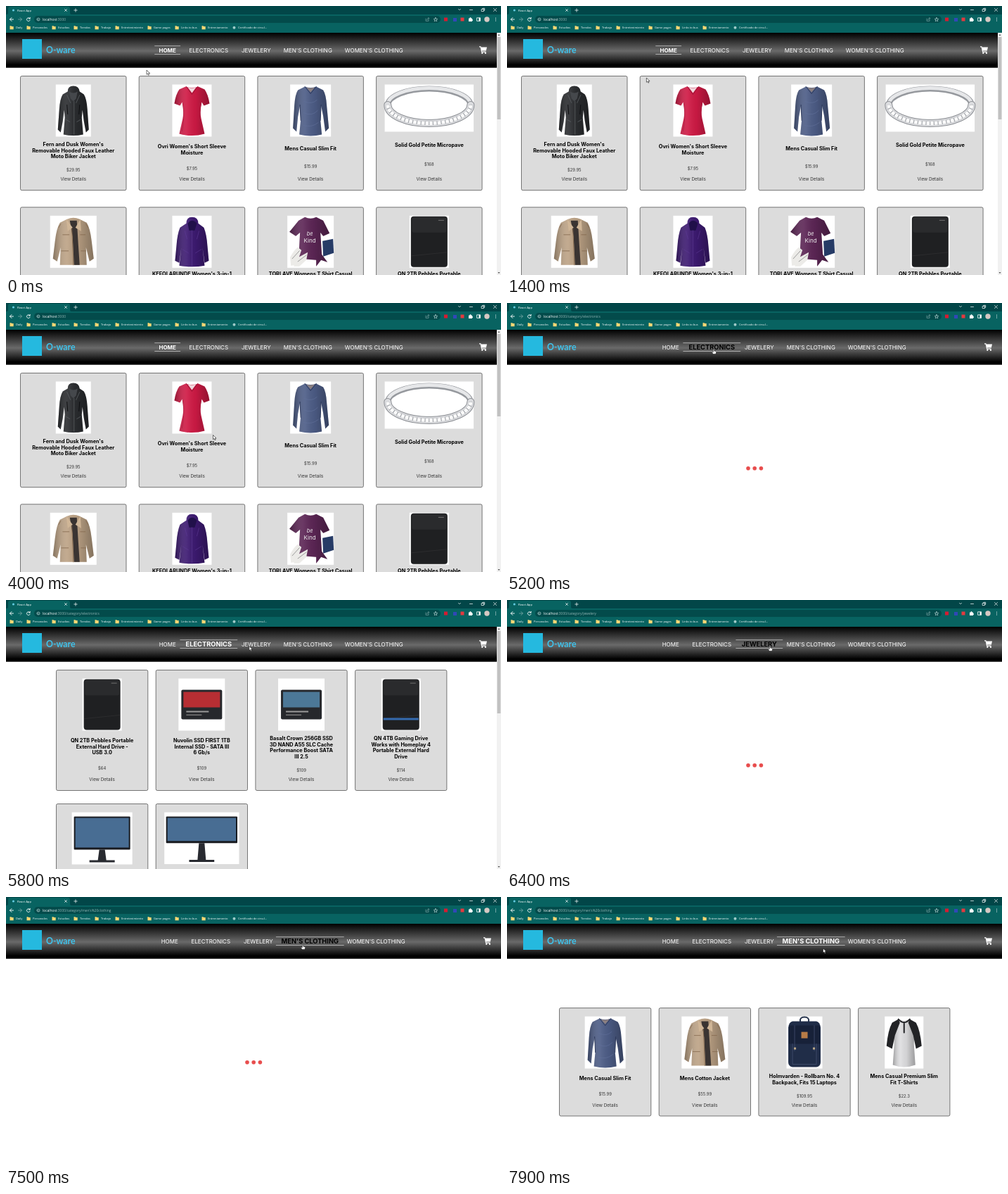
These frames come from a looping animation (704x382 px, 8 s). An HTML page:

```html
<!DOCTYPE html>
<html lang="en">
<head>
<meta charset="utf-8">
<title>Shop</title>
<style>
html, body { margin: 0; width: 100%; height: 100%; overflow: hidden; background: #fff; }
svg { display: block; width: 100vw; height: 100vh; }
text { font-family: Inter, "Open Sans", sans-serif; }
.ui { font-family: "Open Sans", "Noto Sans", sans-serif; font-weight: 500; }
.logo { font-family: Lato, sans-serif; font-weight: 700; }
</style>
</head>
<body>
<svg id="stage" viewBox="0 0 704 382"></svg>
<script>
const LOOP = 8000, STEP = 100;

const rect = (x, y, w, h, fill, more = '') =>
  `<rect x="${x}" y="${y}" width="${w}" height="${h}" fill="${fill}" ${more}/>`;
const circle = (x, y, r, fill) => `<circle cx="${x}" cy="${y}" r="${r}" fill="${fill}"/>`;
const shape = (fill, d) => `<path fill="${fill}" d="${d}"/>`;
const cloth = (fill, d) => shape(fill, d) + shape('url(#folds)', d);
const line = (stroke, d, width = 0.8) =>
  `<path fill="none" stroke="${stroke}" stroke-width="${width}" stroke-linecap="round" stroke-linejoin="round" d="${d}"/>`;
const group = (x, y, body, scale = 1) => `<g transform="translate(${x} ${y}) scale(${scale})">${body}</g>`;
// y is the vertical centre of the line
const text = (x, y, size, body, more = '') =>
  `<text x="${x}" y="${y + size * 0.36}" font-size="${size}" ${more}>${body}</text>`;
const MID = 'text-anchor="middle" ';

// Product pictures: [width, height, markup], centred on x = 0
const drive = rect(-26, 1, 52, 72, '#1f2022', 'rx="4"') + rect(-24.5, 2, 49, 22, '#2a2b2d', 'rx="3"') +
  rect(13, 6, 8, 1.2, '#666') + line('#343537', 'M-25 57L25 52', 0.6);
const ssd = color => rect(-29, 16, 58, 42, '#26282c', 'rx="2"') + rect(-26, 19, 52, 22, color) +
  rect(-22, 46, 32, 2, '#999') + rect(-22, 51, 22, 1.5, '#777');
const screen = (w, h) => rect(-w / 2, 6, w, h, '#191b20', 'rx="1"') + rect(-w / 2 + 2, 8, w - 4, h - 5, '#486d93') +
  shape('#282a30', `M-4 ${h + 6}H4L6 68H18V71H-18V68H-6Z`);
const oval = (rx, ry, cy, w, color = '#999ca1') =>
  `<ellipse cx="0" cy="${cy}" rx="${rx}" ry="${ry}" fill="none" stroke="${color}" stroke-width="${w}"/>`;
const front = 'M-59 29A59 26 0 0 0 59 29';

const ART = {
  leather: [50, 74, cloth('#2a2c2f', 'M-8 10Q-8 2 0 2Q8 2 9 10L15 14Q19 20 20 36L22 64L18 68L15 52L13 36L12 47L14 71Q0 74-14 71L-12 47L-13 36L-15 52L-18 68L-22 64L-20 36Q-19 20-15 14Z') +
    shape('#45484c', 'M-6 10Q0 14 6 10L4 20L0 24L-4 20Z') +
    line('#5b5f63', 'M1 24V71M-9 15L-4 26M9 15L4 26M-10 50L-5 53M10 50L5 53') +
    line('#0d0e10', 'M-9 29L-8 42M9 29L8 42', 1)],
  tee: [56, 74, cloth('#d01a45', 'M-9 3Q0 6 9 3L18 7Q23 14 25 27L17 30L14 25Q11 38 13 48L18 70Q0 75-18 70L-13 48Q-11 38-14 25L-17 30L-25 27Q-23 14-18 7Z') +
    shape('#f0d9de', 'M-6 4Q0 6 6 4L0 12Z') + line('#9b1233', 'M-8 3L0 14L8 3', 1) +
    line('#a9143a', 'M-13 27Q-10 44-14 66M13 27Q9 42 13 66', 0.6)],
  slim: [58, 74, cloth('#4d5d87', 'M-8 3Q0 6 8 3L18 8Q22 14 23 30L26 62L21 67L18 45L15 30L14 50L16 71Q0 75-16 71L-14 50L-15 30L-18 46L-20 67L-25 62L-23 30Q-22 14-18 8Z') +
    shape('#8b7f80', 'M-6 4Q0 6 6 4L0 11Z') + line('#2b3759', 'M-8 3L0 13L8 3M-15 29L-14 51M15 29L14 51', 1) +
    line('#62719a', 'M-9 24Q2 29 9 22M-10 40Q2 46 10 37M-10 58Q1 62 11 54', 0.6)],
  ring: [126.5, 67, line('#96999e', 'M-59 30A59 24 0 0 1 59 30', 8) + line('#e6e7e9', 'M-59 29A59 24 0 0 1 59 29', 5) +
    line('#8b8e93', front, 11) + line('#dcdde0', front, 9) +
    `<path d="${front}" fill="none" stroke="#a4a7ac" stroke-width="5.5"/>` +
    `<path d="${front}" fill="none" stroke="#fafafa" stroke-width="5" stroke-dasharray="4.6 1.2"/>`],
  cotton: [66, 74, cloth('#bda386', 'M-9 5Q0 1 9 5L19 10Q24 18 26 36L29 61L23 65L18 45L19 70H-19L-18 45L-23 65L-29 61L-26 36Q-24 18-19 10Z') +
    shape('#3a3432', 'M-5 7H5L7 40L9 70H1L-1 30Z') + shape('#d0b697', 'M-10 5L-1 17L-8 22ZM10 5L3 17L11 22Z') +
    line('#85694f', 'M-2 18L0 70M-15 27H-6M10 27H17M-17 50H-7M11 50H18M-18 12L-21 17M18 12L21 17')],
  coat: [56, 74, cloth('#3d1a72', 'M-8 11Q-8 2 0 2Q9 2 9 11L17 17Q21 27 22 43L24 64L18 67L15 45L18 71Q0 74-18 71L-15 45L-18 67L-24 64L-22 43Q-21 27-17 17Z') +
    shape('#21104a', 'M-6 11Q0 3 7 11L4 21H-4Z') +
    line('#5f3a96', 'M0 21V71M-13 48L-5 53M13 48L5 53M-10 22L-7 33M10 22L7 33', 0.6)],
  print: [66, 74, cloth('#5d2656', 'M-17 7L-8 2Q0 6 8 2L18 7L27 25L18 29L14 24L16 55L24 66L15 63L8 72L8 63L-17 61L-15 24L-21 29L-30 23Z') +
    shape('#263b66', 'M17 36L32 33L33 53L18 58Z') +
    shape('#ecebe8', 'M-29 59Q-23 48-18 45L-13 49L-20 70L-28 71ZM-17 59L-4 52L-6 63L-16 72H-24Z') +
    line('#888', 'M-26 61L-16 50M-18 65L-6 56') +
    text(-1, 26, 7.5, 'be', MID + 'fill="#eee" font-style="italic"') + text(-1, 35, 8, 'Kind', MID + 'fill="#eee"')],
  drive: [56, 74, drive],
  ssd: [66, 74, ssd('#b72e33')],
  ssd2: [66, 74, ssd('#4c7897')],
  drive4: [56, 74, drive + rect(-25, 56, 50, 3, '#356bb0')],
  monitor: [86, 74, screen(80, 47)],
  wide: [107, 74, screen(102, 38)],
  pack: [51, 74, line('#26334c', 'M-6 7Q-7 1 0 1T6 7', 2) +
    shape('#202d48', 'M-17 7H17Q22 8 23 16V65Q23 71 17 72H-17Q-23 71-23 65V16Q-22 8-17 7Z') +
    shape('#172139', 'M-22 13H22V39H-22Z') + rect(-4.5, 22, 9, 9, '#b67b47') +
    line('#435072', 'M-17 39V68H17V39M-14 13V49M14 13V49') + rect(-15, 44, 3, 3, '#bba889') + rect(12, 44, 3, 3, '#bba889')],
  raglan: [55, 74, cloth('#dedee0', 'M-8 4Q0 8 8 4L15 11L14 40L16 69Q0 75-16 69L-14 40L-15 11Z') +
    shape('#222326', 'M-8 4L-17 9Q-23 20-25 42L-17 46L-13 27L-6 9ZM8 4L17 9Q23 20 25 42L17 46L13 27L6 9Z') +
    line('#222326', 'M-8 4Q0 13 8 4M0 10V23', 2)],
  bracelet: [74, 74, oval(29, 25, 37, 6) +
    '<ellipse cx="0" cy="37" rx="29" ry="25" fill="none" stroke="#777" stroke-width="5" stroke-dasharray="1 2"/>' + circle(0, 62, 5, '#c5a24d')],
  princess: [74, 74, oval(22, 24, 43, 4) + shape('#dfe5ea', 'M-9 12L0 5L9 12L0 24Z') + line('#8e979f', 'M-9 12L0 5L9 12L0 24ZM-9 12H9')],
  plugs: [74, 74, [-16, 16].map(x => circle(x, 37, 14, '#b87967') + circle(x, 37, 9, '#fff')).join('')]
};

function card(x, y, w, h, [name, lines, price]) {
  const [artW, artH, body] = ART[name];
  const scale = Math.min(1, (w - 24) / artW);
  const cx = x + w / 2, top = y + 12, bottom = top + artH * scale, details = y + h - 15.6;
  const gap = (details - 3.5 - bottom - 8.5 * lines.length - 11) / 3;
  const titleY = bottom + gap;
  const priceY = titleY + 8.5 * lines.length + gap + 8.5;
  return rect(x, y, w, h, '#dcdcdc', 'rx="2" stroke="#333" stroke-width=".65"') +
    rect(cx - artW * scale / 2, top, artW * scale, artH * scale, '#fff') + group(cx, top, body, scale) +
    lines.map((s, i) => text(cx, titleY + 4.25 + 8.5 * i, 7.3, s, MID + 'font-weight="700"')).join('') +
    text(cx, priceY, 5.9, '$' + price, MID + 'fill="#333"') +
    text(cx, details, 6.3, 'View Details', MID + 'fill="#333"');
}

const slim = ['slim', ['Mens Casual Slim Fit'], '15.99'];
const cotton = ['cotton', ['Mens Cotton Jacket'], '55.99'];
const ring = ['ring', ['Solid Gold Petite Micropave'], '168'];
const ITEMS = {
  home: [
    ['leather', ["Fern and Dusk Women's", 'Removable Hooded Faux Leather', 'Moto Biker Jacket'], '29.95'],
    ['tee', ["Ovri Women's Short Sleeve", 'Moisture'], '7.95'], slim, ring, cotton,
    ['coat', ["KEFOLARUNDE Women's 3-in-1", 'Snowboard Jacket', 'Winter Coats', 'with Hood'], '56.99'],
    ['print', ['TORLAVE Womens T Shirt Casual', 'Cotton Short', 'Sleeve Summer', 'Top'], '12.99'],
    ['drive', ['QN 2TB Pebbles Portable', 'External', 'Hard Drive', '- USB 3.0'], '64']],
  electronics: [
    ['drive', ['QN 2TB Pebbles Portable', 'External Hard Drive -', 'USB 3.0'], '64'],
    ['ssd', ['Nuvolin SSD FIRST 1TB', 'Internal SSD - SATA III', '6 Gb/s'], '109'],
    ['ssd2', ['Basalt Crown 256GB SSD', '3D NAND A55 SLC Cache', 'Performance Boost SATA', 'III 2.5'], '109'],
    ['drive4', ['QN 4TB Gaming Drive', 'Works with Homeplay 4', 'Portable External Hard', 'Drive'], '114'],
    ['monitor', ['Olmero 21.5 inches Full HD', 'Ultra-Thin'], '599'],
    ['wide', ['Tavelin 49-Inch Curved', 'Gaming Monitor'], '999.99']],
  jewelery: [
    ['bracelet', ["Tessa Brill Women's Fables", 'Sable Gold &amp; Silver Dragon', 'Station Chain Bracelet'], '695'], ring,
    ['princess', ['White Gold Plated Princess'], '9.99'],
    ['plugs', ['Dotted Elk Rose Gold', 'Plated Stainless Steel', 'Double'], '10.99']],
  mens: [slim, cotton,
    ['pack', ['Holmvarden - Rollbarn No. 4', 'Backpack, Fits 15 Laptops'], '109.95'],
    ['raglan', ['Mens Casual Premium Slim', 'Fit T-Shirts'], '22.3']]
};
const GRID = { // left, top, pitch x, pitch y, width, height
  home: [20.5, 99.5, 168.7, 186.3, 150.5, 162.2],
  electronics: [71.5, 99.5, 141.7, 190, 130.3, 171],
  jewelery: [74.5, 153.5, 141.7, 0, 130.3, 162.2],
  mens: [74.5, 157.6, 141.7, 0, 130.3, 153.4]
};
const PATHS = { home: '', electronics: 'category/electronics', jewelery: 'category/jewelery', mens: "category/men's%20clothing" };

function page(name) {
  const [x, y, dx, dy, w, h] = GRID[name];
  return `<g id="${name}">` + ITEMS[name].map((item, i) =>
    card(x + dx * (i % 4), y + dy * Math.floor(i / 4), w, h, item)).join('') + '</g>';
}

function browser() {
  const folders = [[14, 'Daily'], [38, 'Personales'], [74, 'Estudios'], [105, 'Tiendas'], [135, 'Trabajo'],
    [164, 'Entretenimiento'], [210, 'Game pages'], [249, 'Links to bus'], [287, 'Entreniamento']];
  const ui = 'class="ui" fill="#fff"';
  return rect(0, 0, 704, 12, '#024648') + rect(0, 12, 704, 26, '#086361') +
    shape('#086361', 'M1 12Q3 12 3 10V4Q3 1 6 1H88Q91 1 91 4V10Q91 12 93 12Z') +
    circle(10.5, 6, 1.6, '#61c9dd') + text(16, 6, 4.3, 'React App', ui) +
    line('#fff', 'M83.5 4.5L86.5 7.5M86.5 4.5L83.5 7.5M96.8 6H101.2M99 3.8V8.2M643.5 4.3L645 5.8L646.5 4.3M659.5 5.5H663.5M676.5 4.5H679.5V7.5H676.5ZM677.8 4.5V3.3H680.7V6.2H679.5M693.5 3.5L697.5 7.5M697.5 3.5L693.5 7.5', 0.7) +
    rect(40, 14, 578, 10, '#034b4b', 'rx="5"') +
    line('#fff', 'M10.5 19H5.5M8 16.5L5.5 19L8 21.5M33.8 17.6A2.4 2.4 0 1 0 34.2 20M34.2 16.3V18H32.4', 0.9) +
    line('#7ca9a7', 'M17.5 19H22.5M20 16.5L22.5 19L20 21.5', 0.8) +
    line('#d9eaea', 'M44 19A2 2 0 1 0 48 19A2 2 0 1 0 44 19M46 18.8V20M611 16.5L611.8 18.3L613.7 18.5L612.3 19.8L612.7 21.7L611 20.7L609.3 21.7L609.7 19.8L608.3 18.5L610.2 18.3Z', 0.6) +
    line('#8db3b2', 'M597 18V21.3H601V19.5M598.5 19.5Q598.5 17.5 601.5 17.5M600.5 16.2L601.8 17.5L600.5 18.8', 0.6) +
    text(52, 19, 4.9, 'localhost<tspan id="path" fill="#91b5b4"></tspan>', ui) +
    rect(623, 16.5, 5, 5, '#d51c32') + rect(636, 17, 5, 5, '#3148b8') + rect(646.5, 16.5, 5, 5, '#e4393f') +
    shape('#fff', 'M658 17.5H659.5Q659.5 16 660.5 16T661.5 17.5H663V19Q664 19 664 20T663 21V22H658Z') +
    line('#fff', 'M670 16.8H674.5V21.3H670Z', 0.8) + rect(672.5, 16.8, 2, 4.5, '#fff') +
    circle(684, 19, 3.7, '#d6c8c3') + [17, 19, 21].map(y => circle(696.5, y, 0.55, '#fff')).join('') +
    folders.map(([x, name]) => shape('#f6d774', `M${x - 8.5} 28.3H${x - 6.5}L${x - 5.8} 29H${x - 3.3}V33.3H${x - 8.5}Z`) +
      text(x, 30.8, 4.1, name, ui)).join('') +
    circle(324.5, 30.8, 2, '#9fcac8') + text(330, 30.8, 4.1, 'Certificado de circul...', ui);
}

const NAV = [['home', 'HOME', 232.7, 18], ['electronics', 'ELECTRONICS', 291.3, 40.5], ['jewelery', 'JEWELERY', 358.8, 33],
  ['mens', "MEN'S CLOTHING", 432.3, 48], ['womens', "WOMEN'S CLOTHING", 526.2, 48]];

function nav(active, hovered, scrolled) {
  return NAV.map(([id, label, x, half]) => {
    const hot = id === active || id === hovered;
    const cx = x - (scrolled ? 3 : 0);
    const size = hot ? (id === 'home' ? 8 : 9.3) : 8;
    return text(cx, 62.7, size, label, MID + `font-weight="${hot ? 700 : 400}" fill="${id === hovered ? '#000' : '#fff'}"`) +
      (hot ? line('#d8d8d8', `M${cx - half} 56.7H${cx + half}M${cx - half} 68.5H${cx + half}`, 0.7) : '');
  }).join('');
}

const cart = shape('#fff', 'M0 0H2.3L2.8 1.3H11L9.8 6.3H3.9L4.1 7.4H9.6V8.5H3.2L1.6 1.2H0Z') +
  circle(4.3, 9.7, 1.1, '#fff') + circle(8.9, 9.7, 1.1, '#fff');
const scrollbar = rect(698, 38, 6, 344, '#f1f1f1') + rect(698.6, 44, 4.8, 117, '#c1c1c1') +
  shape('#555', 'M699.5 42L701 40L702.5 42ZM699.5 378L701 380L702.5 378Z');
const arrow = '<path d="M0 0V6.3L1.5 5L2.5 7.2L3.6 6.7L2.7 4.6H4.6Z" fill="#fff" stroke="#111" stroke-width=".6"/>';
const hand = '<path d="M-.7 0Q0-.8.7 0V2.6L3.2 3.2Q3.8 3.5 3.6 4.4L2.9 7H-.8L-2.6 4.4Q-2.5 3.3-.7 4.3Z" fill="#fff" stroke="#111" stroke-width=".5"/>';

document.getElementById('stage').innerHTML =
  `<defs><linearGradient id="shade" x2="0" y2="1">
    <stop stop-color="#000"/><stop offset=".52" stop-color="#6a6a6a"/>
    <stop offset=".92" stop-color="#000"/><stop offset="1" stop-color="#000"/></linearGradient>
  <linearGradient id="folds">
    <stop stop-color="#000" stop-opacity=".3"/><stop offset=".35" stop-color="#fff" stop-opacity=".08"/>
    <stop offset=".6" stop-color="#000" stop-opacity=".05"/><stop offset="1" stop-color="#000" stop-opacity=".3"/></linearGradient></defs>` +
  rect(0, 0, 704, 382, '#fff') + Object.keys(ITEMS).map(page).join('') +
  `<g id="loader">${[343, 352.2, 361.4].map(x => circle(x, 234.7, 2.8, '#e84d4d')).join('')}</g>` +
  rect(0, 38, 704, 49.7, 'url(#shade)') + rect(23, 47, 28, 28, '#25b9df') +
  text(57, 62.5, 12.3, 'O-ware', 'class="logo" fill="#3fc3ec"') +
  `<g id="nav"></g><g id="cart">${cart}</g><g id="scrollbar">${scrollbar}</g>` + browser() +
  `<g id="pointer"><g id="arrow">${arrow}</g><g id="hand">${hand}</g></g>`;

const $ = id => document.getElementById(id);
const show = (id, on) => $(id).setAttribute('display', on ? 'inline' : 'none');
const move = (id, x, y) => $(id).setAttribute('transform', `translate(${x} ${y})`);

// Each entry holds from its time on
const VIEWS = [[0, 'home'], [5000, 'electronics', true], [5400, 'electronics'], [6300, 'jewelery', true],
  [6600, 'jewelery'], [7400, 'mens', true], [7700, 'mens']];
const HOVERS = [[0, ''], [5000, 'electronics'], [5700, ''], [5900, 'jewelery'], [6900, ''], [7200, 'mens'], [7800, '']];
const ROUTE = [[0, 200, 91], [1200, 200, 91], [2100, 187, 178], [2600, 184, 200.5], [3600, 184, 200.5],
  [4000, 294.5, 187.5], [4200, 315, 145], [4500, 301, 77], [4700, 294.5, 70], [4900, 294.5, 70], [5000, 294, 65.5],
  [5500, 294, 65.5], [6000, 374, 65.5], [6800, 374, 65.5], [7300, 422, 67.5], [7700, 422, 67.5], [7900, 449.5, 73]];
const current = (list, t) => list.filter(entry => entry[0] <= t).pop();

function pointerAt(t) {
  const from = current(ROUTE, t), to = ROUTE[ROUTE.indexOf(from) + 1] || from;
  const k = to === from ? 0 : (t - from[0]) / (to[0] - from[0]);
  const ease = k * k * (3 - 2 * k);
  return [1, 2].map(i => from[i] + (to[i] - from[i]) * ease);
}

function draw(t) {
  const [, view, loading = false] = current(VIEWS, t);
  const hovered = current(HOVERS, t)[1];
  const scrolled = !loading && (view === 'home' || view === 'electronics');
  Object.keys(ITEMS).forEach(name => show(name, name === view && !loading));
  show('loader', loading);
  show('scrollbar', scrolled);
  $('path').textContent = ':3000' + (PATHS[view] && '/' + PATHS[view]);
  $('nav').innerHTML = nav(view, hovered, scrolled);
  move('cart', scrolled ? 673 : 679, 57.2);
  move('pointer', ...pointerAt(t));
  show('arrow', !hovered);
  show('hand', hovered);
}

function tick(now) {
  draw(Math.floor(now % LOOP / STEP) * STEP);
  requestAnimationFrame(tick);
}
draw(0);
requestAnimationFrame(tick);
</script>
</body>
</html>
```
